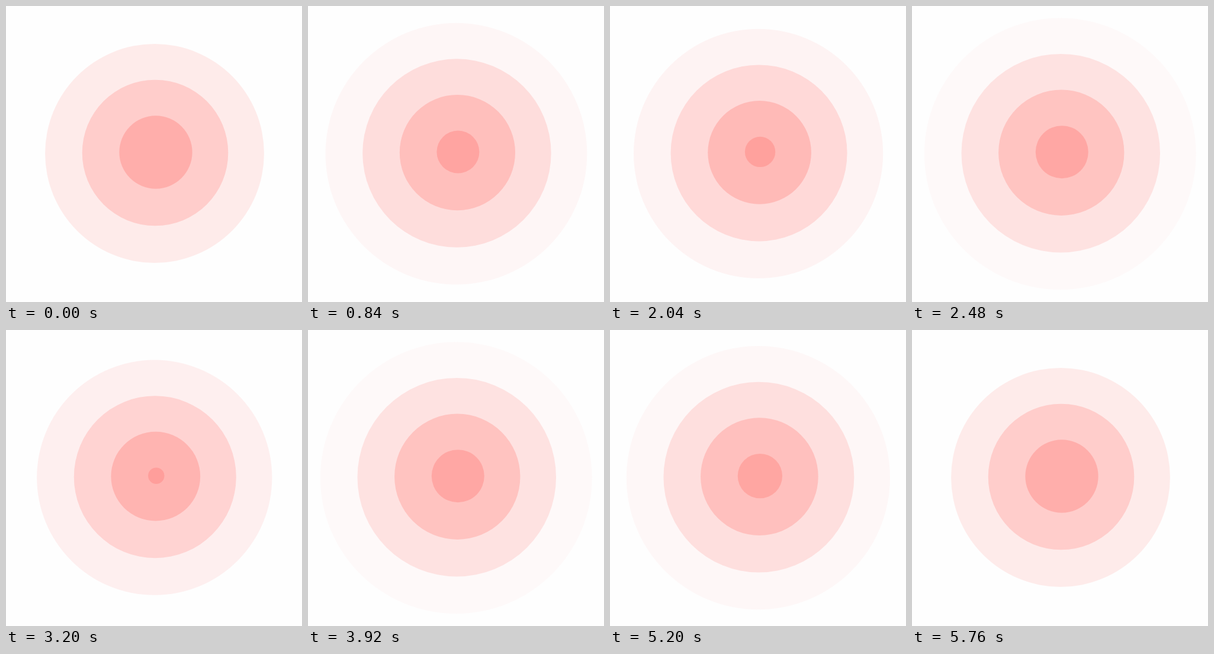
These frames come from a looping animation (500 by 500 pixels, 5800 ms). An HTML page with a canvas:

```html
<!DOCTYPE html>
<html lang="en">
<head>
<meta charset="utf-8">
<title>Ripple</title>
<style>
  html, body { margin: 0; width: 100%; height: 100%; overflow: hidden; background: #fefefe; }
  canvas { display: block; width: 500px; height: 500px; }
</style>
</head>
<body>
<canvas id="stage" width="500" height="500"></canvas>
<script>
  const ctx = document.getElementById('stage').getContext('2d');
  const LOOP = 5800, LIFE = 5760, STEP = 40, RINGS = 4;
  const MAX_R = 246.6, PEAK = 0.7, FADE_IN = 0.05;

  // Quick fade in at birth, then a linear fade out
  function opacity(p) {
    return PEAK * (1 - p) * Math.min(1, (p / FADE_IN) ** 4);
  }

  // The centre drifts diagonally from (254, 246) to (250, 250) as the ring grows
  function drawRing(p) {
    ctx.globalAlpha = opacity(p);
    ctx.beginPath();
    ctx.arc(254 - 4 * p, 246 + 4 * p, MAX_R * p, 0, Math.PI * 2);
    ctx.fill();
  }

  function draw(ms) {
    const t = Math.floor((ms % LOOP) / STEP) * STEP;
    ctx.globalAlpha = 1;
    ctx.fillStyle = '#fefefe';
    ctx.fillRect(0, 0, 500, 500);
    ctx.fillStyle = 'rgb(255, 147, 143)';
    for (let i = 0; i < RINGS; i++) {
      drawRing((t / LIFE + i / RINGS) % 1);
    }
  }

  const start = performance.now();
  function tick() {
    draw(performance.now() - start);
    requestAnimationFrame(tick);
  }
  tick();
</script>
</body>
</html>
```
